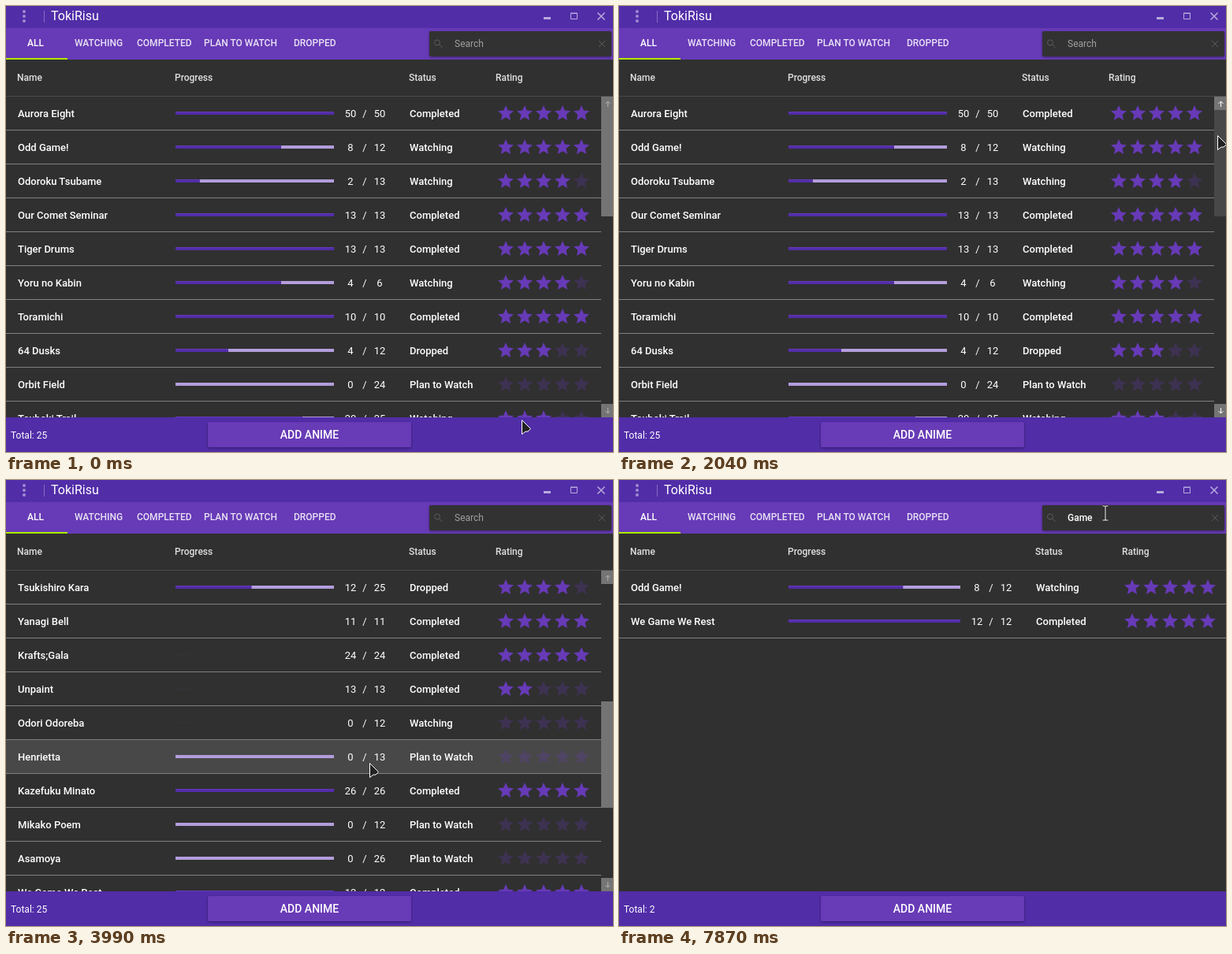
These frames come from a looping animation (770 px wide and 566 px high, 8000 ms). An HTML page:

```html
<!DOCTYPE html>
<html lang="en">
<head>
<meta charset="utf-8">
<title>TokiRisu</title>
<style>
  html, body { margin: 0; width: 100%; height: 100%; overflow: hidden; background: #303030; }
  svg { display: block; font-family: Roboto, "Liberation Sans", sans-serif; fill: #fff; }
  .m { font-weight: 500; }
  .mid { text-anchor: middle; }
  .s12 { font-size: 12px; }
  .s13 { font-size: 13px; }
  .line { fill: none; stroke: #fff; }
</style>
</head>
<body>
<svg id="stage" width="770" height="566" viewBox="0 0 770 566">
  <defs>
    <path id="star" fill="#673ab7" d="M0 5.27 6.18 9 4.54 1.97 10-2.76 2.81-3.38 0-10-2.81-3.38-10-2.76-4.55 1.97-6.18 9Z"/>
    <clipPath id="listClip"><rect y="115" width="770" height="407"/></clipPath>
    <filter id="shadow" x="-5%" y="-20%" width="110%" height="150%">
      <feDropShadow dx="0" dy="1" stdDeviation="1.6" flood-opacity=".42"/>
    </filter>
  </defs>
  <rect width="770" height="566" fill="#303030"/>

  <rect width="770" height="28" fill="#512da8"/>
  <g opacity=".45">
    <circle cx="23" cy="7" r="2"/><circle cx="23" cy="13" r="2"/><circle cx="23" cy="19" r="2"/>
  </g>
  <rect x="48" y="6" width="1" height="15" opacity=".3"/>
  <text x="57" y="18" font-size="16">TokiRisu</text>
  <g opacity=".6">
    <rect x="682" y="14" width="9" height="3"/>
    <path class="line" d="M716.5 9.5h8v7h-8zM716 9h9"/>
    <path class="line" stroke-width="1.5" d="M750.5 8.5l9 9m0-9l-9 9"/>
  </g>

  <rect y="28" width="770" height="40" fill="#673ab7"/>
  <g id="tabs" class="m s12"></g>
  <rect y="66" width="78" height="2" fill="#aeea00"/>
  <rect x="537" y="32" width="231" height="32" rx="2" fill="#303030" filter="url(#shadow)"/>
  <g class="line" style="stroke:#5c5c5c">
    <circle cx="547" cy="46.5" r="3.5"/><path d="M549.5 49l4 4M752 44l8 8m0-8l-8 8"/>
  </g>
  <text id="query" class="s12" x="569" y="52"></text>
  <rect id="caret" y="41" width="1" height="14"/>

  <g id="heads" class="m s12" fill="#e0e0e0"></g>
  <rect y="114" width="770" height="1" fill="#4a4a4a"/>
  <g id="list" clip-path="url(#listClip)"></g>
  <g id="scrollbar">
    <g fill="#747474">
      <rect x="755" y="115" width="15" height="17"/>
      <rect x="755" y="505" width="15" height="17"/>
    </g>
    <path id="arrows" class="line" d="M763.5 128v-7m-3 3l3-3 3 3M763.5 510v7m-3-3l3 3 3-3"/>
    <rect id="thumb" x="755" width="15" height="135"/>
  </g>

  <rect y="522" width="770" height="44" fill="#512da8"/>
  <text id="total" class="s12" x="6" y="549"></text>
  <rect x="256" y="528" width="258" height="32" rx="2" fill="#673ab7" filter="url(#shadow)"/>
  <text class="m mid" x="385" y="549" font-size="14">ADD ANIME</text>

  <path id="arrow" fill="#222" stroke="#fff" d="M.5.5V18.5L5 15H8L11.5 11.5Z"/>
  <g id="beam" fill="none">
    <path stroke="#222" stroke-width="3" d="M-3.5-9h7M0-9V9M-3.5 9h7"/>
    <path stroke="#fff" d="M-3.5-9h3L0-8.5.5-9h3M0-9V9M-3.5 9h7"/>
  </g>
</svg>
<script>
const LOOP = 8000, ROW = 43, TOP = 115, STEP = 14.92, GROW = 1000;
const DRAG_START = 2040, DRAG_END = 3350, FOCUS = 5330, BLINK = 580;
const STATUS = { C: 'Completed', W: 'Watching', P: 'Plan to Watch', D: 'Dropped' };

// name | seen | episodes | status | rating
const shows = `Aurora Eight|50|50|C|5
Odd Game!|8|12|W|5
Odoroku Tsubame|2|13|W|4
Our Comet Seminar|13|13|C|5
Tiger Drums|13|13|C|5
Yoru no Kabin|4|6|W|4
Toramichi|10|10|C|5
64 Dusks|4|12|D|3
Orbit Field|0|24|P|0
Tsubaki Trail|20|25|W|3
Tsukishiro Kara|12|25|D|4
Yanagi Bell|11|11|C|5
Krafts;Gala|24|24|C|5
Unpaint|13|13|C|2
Odori Odoreba|0|12|W|0
Henrietta|0|13|P|0
Kazefuku Minato|26|26|C|5
Mikako Poem|0|12|P|0
Asamoya|0|26|P|0
We Game We Rest|12|12|C|5
Kumo no Hashira|1|1|C|5
Yukimidori|0|12|P|0
Natsuzora|0|12|P|0
Hoshi Tabi|12|12|C|4
Blue Lantern|0|24|P|0`.split('\n').map(line => {
  const [name, seen, episodes, status, rating] = line.split('|');
  return { name, seen: +seen, episodes: +episodes, status: STATUS[status], rating: +rating };
});

// time, x, y
const pointerPath = [
  [80, 654, 525], [300, 640, 440], [710, 600, 274], [860, 592, 193], [1000, 596, 130],
  [1200, 630, 78], [1400, 690, 95], [1730, 750, 168], [1810, 757, 168], [1890, 759, 164],
  [2110, 759, 164], [2360, 762, 209], [2415, 763, 224], [2650, 765, 329], [2750, 766, 356],
  [2830, 766, 357], [3000, 764, 406], [3350, 760, 410], [3500, 700, 400], [3690, 500, 372],
  [3850, 461, 359], [4300, 461, 359], [4640, 475, 310], [4930, 524, 158], [5010, 524, 158],
  [5200, 595, 62], [5370, 606, 51], [6860, 606, 51], [7200, 622, 35], [7500, 619, 36],
  [7660, 608, 44], [7800, 615, 45], [7870, 617, 42]
];
const wheel = [[3920, 13], [3985, 10], [4045, 7], [4175, 4], [4550, 0]];
const keys = [[6060, 'G'], [6210, 'Ga'], [6500, 'Gam'], [6840, 'Game']];

const $ = id => document.getElementById(id);
const latest = (steps, t) => steps.filter(s => s[0] <= t).pop();

function pointerAt(t) {
  const i = pointerPath.findIndex(p => p[0] > t);
  const [t1, x1, y1] = pointerPath[i < 0 ? pointerPath.length - 1 : i];
  if (i <= 0) return { x: x1, y: y1 };
  const [t0, x0, y0] = pointerPath[i - 1];
  const k = (t - t0) / (t1 - t0);
  return { x: x0 + (x1 - x0) * k, y: y0 + (y1 - y0) * k };
}

function scrollAt(t) {
  const turn = latest(wheel, t);
  if (turn) return turn[1];
  if (t < DRAG_START) return 0;
  const { y } = pointerAt(Math.min(t, DRAG_END));
  return Math.max(0, Math.min(16, Math.floor((y - 164) / STEP)));
}

const filterBy = query =>
  shows.filter(s => s.name.toLowerCase().includes(query.toLowerCase()));

// A row's bar expands each time the row enters the realised window.
shows.forEach(s => { s.starts = [[-GROW]]; });
for (let t = 0, before = 0; t < keys[0][0]; t += 2) {
  const now = scrollAt(t);
  if (now === before) continue;
  shows.forEach((show, i) => {
    const inside = first => i >= first - 1 && i <= first + 9;
    if (!inside(now) || inside(before)) return;
    const lag = now < before ? (before - 2 - i) * 7 : 0;
    show.starts.push([t + lag]);
  });
  before = now;
}
keys.slice(0, 3).forEach(([t, query]) =>
  filterBy(query).forEach(s => s.starts.push([t])));

const text = (x, y, body, cls) => `<text x="${x}" y="${y}" class="${cls}">${body}</text>`;
const rect = (x, y, w, h, fill) =>
  `<rect x="${x}" y="${y}" width="${w}" height="${h}" fill="${fill}"/>`;

function barMarkup(show, y, width, t) {
  const u = Math.max(0, Math.min(1, (t - latest(show.starts, t)[0]) / GROW));
  const scale = Math.sin(u * Math.PI / 2);
  const done = width * show.seen / show.episodes;
  return `<g opacity="${scale}" transform="translate(215 ${y}) scale(${scale})">` +
    rect(0, -2, width, 4, '#b39ddb') + rect(0, -2, done, 4, '#512da8') +
    rect(0, -2, done, 1, '#673ab7') + '</g>';
}

function rowMarkup(show, slot, shift, hovered, t) {
  const top = TOP + ROW * slot, mid = top + 21, base = top + 26;
  let out = hovered ? rect(0, top, 755 + shift, 42, '#484848') : '';
  out += rect(0, top + 42, 755 + shift, 1, '#808080');
  out += text(15, base, show.name, 'm s13') + barMarkup(show, mid, 201 + shift, t);
  out += text(437 + shift, base, show.seen, 's13 mid');
  out += text(455 + shift, base, '/', 's13 mid');
  out += text(474 + shift, base, show.episodes, 's13 mid');
  out += text(512 + shift, base, show.status, 'm s13');
  for (let i = 0; i < 5; i++) {
    out += `<use href="#star" x="${634 + 24 * i + shift}" y="${mid}" opacity="${i < show.rating ? 1 : 0.26}"/>`;
  }
  return out;
}

const headMarkup = shift => text(14, 95, 'Name', '') + text(214, 95, 'Progress', '') +
  text(511 + shift, 95, 'Status', '') + text(621 + shift, 95, 'Rating', '');

$('tabs').innerHTML = [['ALL', 27], ['WATCHING', 87], ['COMPLETED', 166],
  ['PLAN TO WATCH', 251], ['DROPPED', 365]].map(([label, x], i) =>
  `<text x="${x}" y="51" opacity="${i ? 0.85 : 1}">${label}</text>`).join('');

function drawSearch(t, typed) {
  const field = $('query');
  field.textContent = typed ? typed[1] : 'Search';
  field.setAttribute('fill', typed ? '#fff' : '#a0a0a0');
  field.setAttribute('font-weight', typed ? 500 : 400);
  $('caret').setAttribute('x', typed ? 569 + Math.round(field.getComputedTextLength()) : 569);
  const since = t - (typed ? typed[0] : FOCUS);
  const lit = since >= 0 && since % (2 * BLINK) < BLINK;
  $('caret').setAttribute('visibility', lit ? 'visible' : 'hidden');
}

function draw(t) {
  const { x, y } = pointerAt(t);
  const typed = latest(keys, t);
  const rows = filterBy(typed ? typed[1] : '');
  const scroll = scrollAt(t);
  const shift = typed ? 17 : 0;
  const hovered = x < 755 && y >= TOP && y < 522 ? Math.floor((y - TOP) / ROW) : -1;

  $('list').innerHTML = rows.slice(scroll, scroll + 10)
    .map((show, i) => rowMarkup(show, i, shift, i === hovered, t)).join('');
  $('heads').innerHTML = headMarkup(shift);
  $('total').textContent = 'Total: ' + rows.length;
  drawSearch(t, typed);

  const overBar = x >= 755 && y >= TOP && y < 522;
  $('scrollbar').setAttribute('visibility', typed ? 'hidden' : 'visible');
  $('thumb').setAttribute('y', Math.round(132 + scroll * STEP));
  $('thumb').setAttribute('fill', overBar ? '#484848' : '#747474');
  $('arrows').style.stroke = overBar ? '#fff' : '#b0b0b0';

  const inSearch = x >= 537 && x < 768 && y >= 32 && y < 64;
  const place = `translate(${Math.round(x)} ${Math.round(y)})`;
  for (const [id, shown] of [['arrow', !inSearch], ['beam', inSearch]]) {
    $(id).setAttribute('transform', place);
    $(id).setAttribute('visibility', shown ? 'visible' : 'hidden');
  }
}

function tick() {
  draw(performance.now() % LOOP);
  requestAnimationFrame(tick);
}
tick();
</script>
</body>
</html>
```
